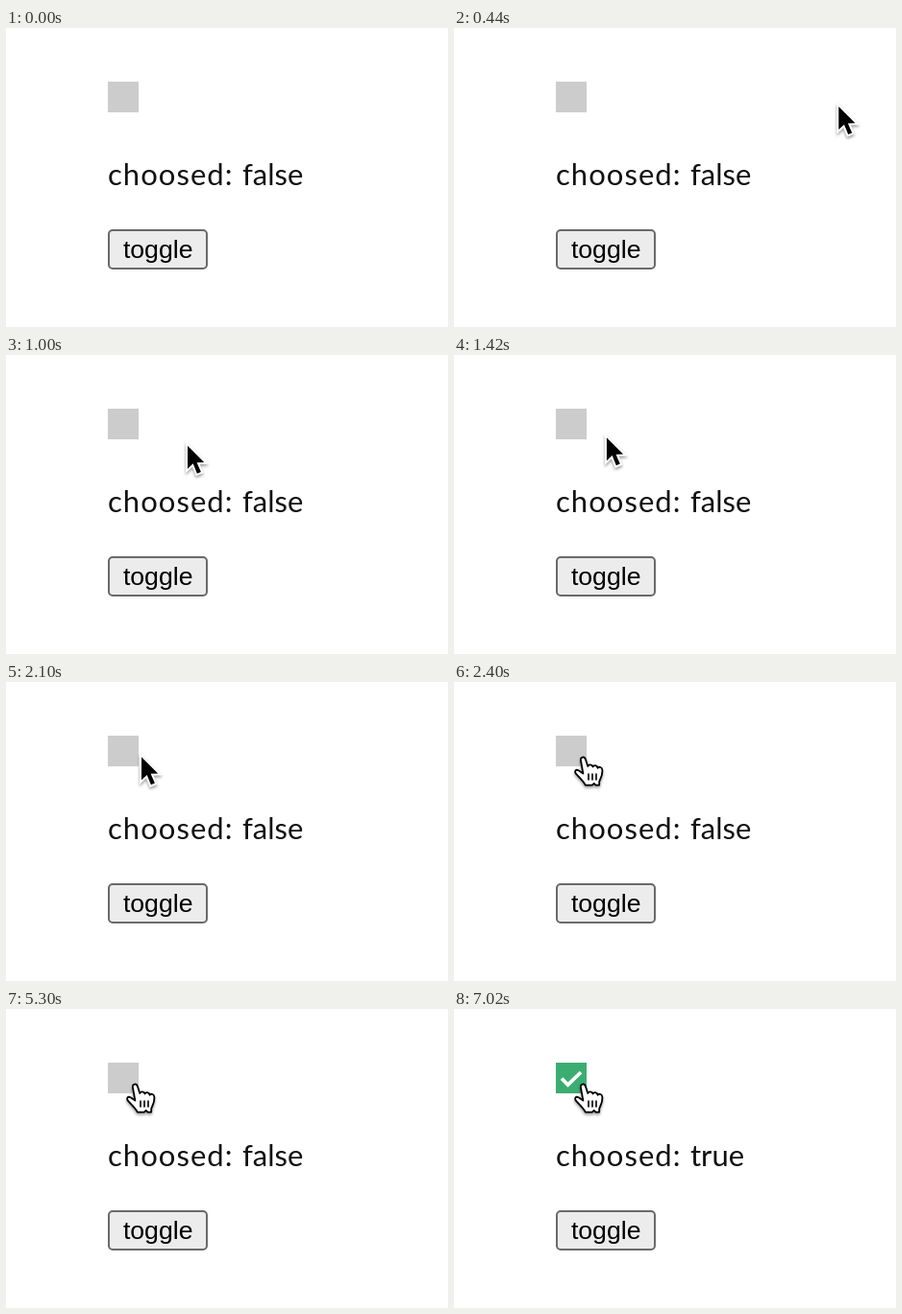
Write an HTML page that moves like this. It is 460 px wide and 312 px high and loops after 8 s.

```html
<!DOCTYPE html>
<html lang="en">
<head>
<meta charset="utf-8">
<title>Checkbox toggle</title>
<style>
  html, body { margin: 0; width: 100%; height: 100%; overflow: hidden; background: #fff; }
  svg { display: block; }
  .label { font: 31px Lato, "Open Sans", sans-serif; fill: #111; }
  .spaced { letter-spacing: 1.05px; }
  .button { font: 26.667px "Liberation Sans", Arial, sans-serif; fill: #000; }
  .cursor { filter: drop-shadow(0 2px 1.5px rgba(0, 0, 0, .38)); }
</style>
</head>
<body>
<svg width="460" height="312" viewBox="0 0 460 312">
  <rect id="box" x="106" y="56" width="32" height="32" fill="#ccc"/>
  <path id="check" d="M112 72.5 L118.5 79 L132 66" fill="none" stroke="#fff" stroke-width="3.8"/>

  <text class="label spaced" x="106" y="163.6">choosed:</text>
  <text class="label" id="value" x="246" y="163.6">false</text>

  <rect x="107" y="211" width="102" height="40" rx="4" fill="#ececec" stroke="#6a6a6a" stroke-width="2"/>
  <text class="button" x="121.9" y="240">toggle</text>

  <g id="arrow" class="cursor">
    <path d="M0 0 V24 L5.7 18.6 L9.9 29 L13.9 27.3 L9.6 17.5 L17.2 17.2 Z"
      stroke="#fff" stroke-width="4" paint-order="stroke"/>
  </g>
  <g id="hand" class="cursor" stroke="#000" stroke-linejoin="round" stroke-linecap="round">
    <path fill="#fff" stroke-width="1.8" d="M132 82.2 C131 78 135.7 77 137 81 L139.3 88
      C140 85.7 143.8 85.7 144.6 88.5 C145.6 86.2 148.9 86.7 149.6 89.8 C151 88 154.4 88.6 154.4 92.3
      C154.6 98 152.6 100 151.2 104 V107.6 H147.6 L145.7 105.8 L143.8 107.6 H136.8
      C135 104 130.5 99.5 127.3 96.2 C124.8 93.4 126.8 90.7 129.6 92.3 L134.4 95.6 Z"/>
    <path fill="none" stroke-width="1.6" d="M140 96 V102 M144 96 V102 M148 96 V102"/>
  </g>
</svg>
<script>
  const LOOP = 8000;
  const HAND_AT = 2280;
  const TOGGLES = [3100, 5300, 7020];

  const mix = (a, b, u) => a + (b - a) * u;
  const ease = u => 1 - (1 - u) ** 2;

  // Each glide holds its last point until the next one begins.
  const glides = [
    { start: 280, end: 1000, steps: 17,
      at: u => [450 - 265.8 * u + 4.8 * u * u, 65.7 + 100.9 * u - 71.9 * u * u] },
    { start: 1100, end: 1840, steps: 16,
      at: u => [mix(189, 142, ease(u)), mix(94.7, 81.5, ease(u))] },
    { start: 2100, end: 2400, steps: 6,
      at: u => [mix(141, 134, u), mix(78.3, 78, u)] }
  ];

  const byId = id => document.getElementById(id);
  const box = byId("box"), check = byId("check"), value = byId("value");
  const arrow = byId("arrow"), hand = byId("hand");
  const show = (el, on) => el.setAttribute("visibility", on ? "visible" : "hidden");

  function tipAt(t) {
    const glide = glides.filter(g => t >= g.start).pop();
    if (!glide) return null;
    const last = glide.steps - 1;
    const raw = (t - glide.start) / (glide.end - glide.start) * last;
    return glide.at(Math.min(last, Math.floor(raw + .2)) / last);
  }

  function draw(t) {
    const chosen = TOGGLES.filter(time => t >= time).length % 2 === 1;
    box.setAttribute("fill", chosen ? "#3bad72" : "#ccc");
    show(check, chosen);
    value.textContent = String(chosen);

    const tip = tipAt(t);
    const pointing = t >= HAND_AT;
    show(arrow, tip && !pointing);
    show(hand, pointing);
    if (!tip) return;
    const [x, y] = tip;
    arrow.setAttribute("transform", `translate(${x} ${y})`);
    hand.setAttribute("transform", `translate(${x - 134} ${y - 78})`);
  }

  const began = performance.now();
  function tick() {
    draw((performance.now() - began) % LOOP);
    requestAnimationFrame(tick);
  }
  draw(0);
  requestAnimationFrame(tick);
</script>
</body>
</html>
```
